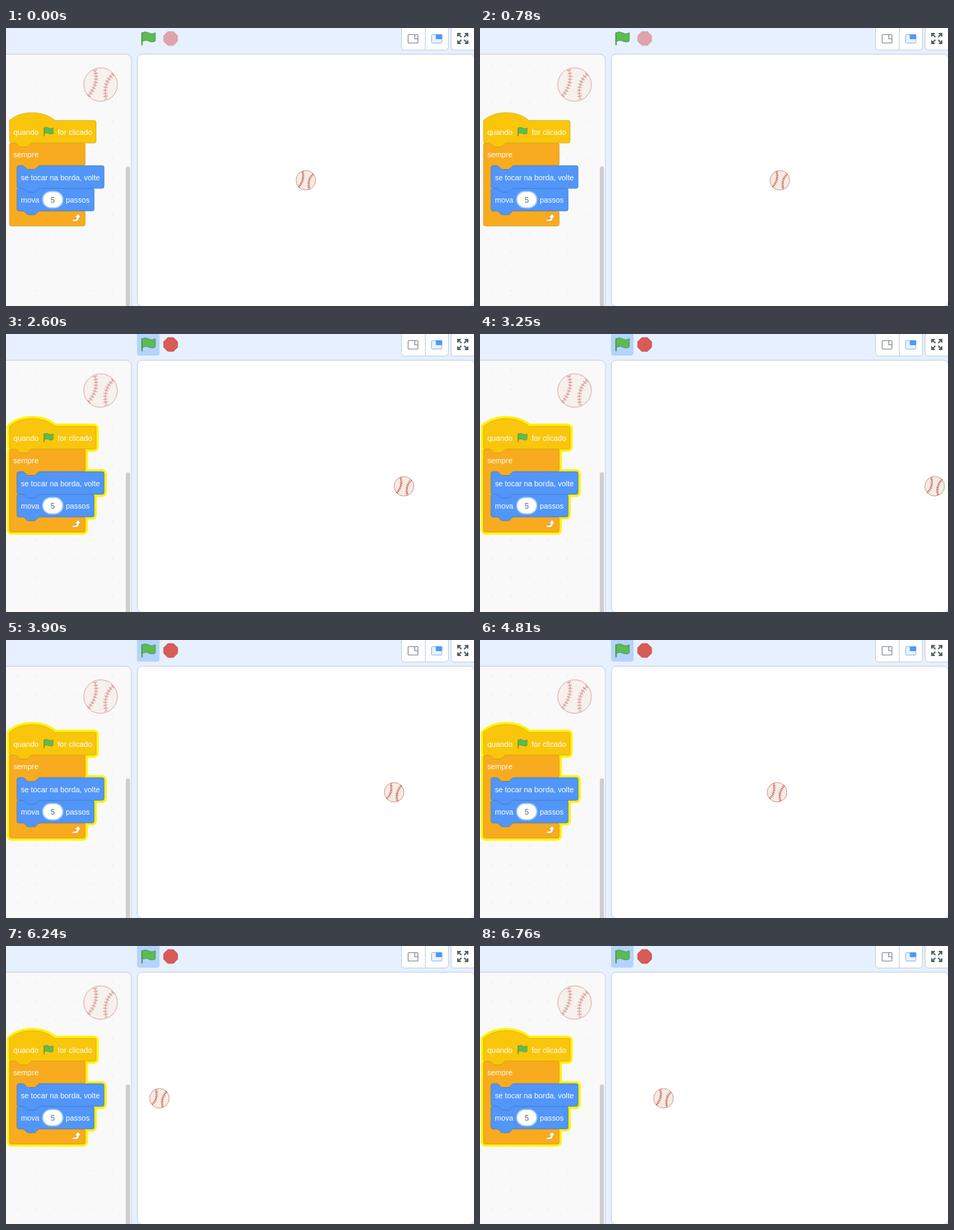
An HTML page for the animation above (6.89 s loop, 668 by 398 pixels).

```html
<!DOCTYPE html>
<html lang="pt">
<head>
<meta charset="utf-8">
<title>Bola na borda</title>
<style>
  html, body { margin: 0; width: 100%; height: 100%; overflow: hidden; background: #e6f0ff; }
  svg { display: block; width: 668px; height: 398px; }
  text { font: 16px "Liberation Sans", Arial, sans-serif; fill: #fff; }
  .panel { stroke: #c6d0df; }
  .event { fill: #f9c60c; stroke: #d3a310; }
  .control { fill: #f8ab1e; stroke: #d18f1b; }
  .motion { fill: #5196f8; stroke: #3c78cf; }
  .seam { fill: none; stroke-width: 1.2; }
  .ticks { fill: none; stroke-width: 6; stroke-dasharray: 1.5 2.8; }
  #flagBack { fill: #4c97ff; fill-opacity: 0; }
  .hover #flagBack { fill-opacity: .15; }
  .running #flagBack { fill-opacity: .33; }
  #stop { fill: #d85b55; opacity: .5; }
  .running #stop { opacity: 1; }
  #glow { visibility: hidden; fill: #fff200; stroke: #fff200; stroke-width: 11; stroke-linejoin: round; }
  .running #glow { visibility: visible; }
</style>
</head>
<body>
<svg id="scene" viewBox="0 0 668 398">
  <defs>
    <pattern id="dots" x="3.5" y="38.5" width="27" height="27" patternUnits="userSpaceOnUse">
      <circle cx="13.5" cy="13.5" r=".8" fill="#dedede"/>
    </pattern>
    <filter id="soft" x="-20%" y="-20%" width="140%" height="140%"><feGaussianBlur stdDeviation=".8"/></filter>
    <g id="flag">
      <path d="M1.2 2V19" stroke="#45993d" stroke-width="1.8" stroke-linecap="round"/>
      <path d="M1.2 2.3C5-.2 8 .8 11 2.3S17 3.6 20 1.8V13.6C17 15.4 14 15.2 11 13.8S5 12.2 1.2 14.4Z" fill="#5dbb55" stroke="#45993d"/>
    </g>
    <g id="baseball">
      <circle r="24" fill="#f6ebe4"/>
      <g id="seams">
        <path class="seam" d="M-8-21Q-2-1-18 17"/>
        <path class="ticks" d="M-8-21Q-2-1-18 17"/>
        <path class="seam" d="M18-15Q3-2 8 21"/>
        <path class="ticks" d="M18-15Q3-2 8 21"/>
      </g>
    </g>
    <path id="corner" d="M-7-2.8V-7H-2.8M-6.4-6.4L-2-2" fill="none" stroke="#4c665f" stroke-width="2"/>
  </defs>

  <rect width="668" height="398" fill="#e6f0ff"/>

  <!-- workspace -->
  <rect class="panel" x="-9.5" y="37.5" width="188.5" height="372" rx="8" fill="#f9f9f9"/>
  <rect y="39" width="170" height="359" fill="url(#dots)"/>
  <rect x="171" y="198" width="6" height="210" rx="3" fill="#cecece"/>
  <use href="#baseball" x="135" y="81" stroke="#c47468" opacity=".6"/>

  <!-- blocks, drawn in block units -->
  <g transform="translate(5 132.3) scale(.675)">
    <g id="glow" filter="url(#soft)"></g>
    <g id="blocks"></g>
    <text x="8" y="31">quando</text>
    <use href="#flag" transform="translate(72 14)"/>
    <text x="102" y="31">for clicado</text>
    <text x="8" y="78">sempre</text>
    <text x="24" y="127">se tocar na borda, volte</text>
    <text x="24" y="174">mova</text>
    <rect x="71.5" y="152" width="40" height="32" rx="16" fill="#fff" stroke="#a9cbfb" stroke-width="5" paint-order="stroke"/>
    <text x="91.5" y="174" text-anchor="middle" style="fill:#575e75">5</text>
    <text x="119" y="174">passos</text>
    <path d="M133 214H141Q147 213 147 206H151L145 198 138 206H142Q142 210 138 210H133Z" fill="#fff" stroke="#cf8b17" stroke-width=".8"/>
  </g>

  <!-- run controls -->
  <rect id="flagBack" x="187" y="-4" width="32" height="35" rx="4"/>
  <use href="#flag" x="193" y="5"/>
  <path id="stop" d="M231 5H239L245 11V19L239 25H231L225 19V11Z" stroke="#b84a48" stroke-width=".6"/>

  <!-- view buttons -->
  <g fill="#fff">
    <rect class="panel" x="564.5" y="-6" width="67" height="37.5" rx="4"/>
    <path class="panel" d="M598.5 0V31"/>
    <rect class="panel" x="635.5" y="-6" width="45" height="37.5" rx="4"/>
  </g>
  <g fill="none" stroke="#858b98" stroke-width="1.2">
    <rect x="574" y="9.5" width="14" height="12" rx="1"/>
    <path d="M583.5 9.5V15.5H588"/>
  </g>
  <rect x="607.5" y="9.5" width="14.5" height="12" rx="1" fill="#eaf3ff" stroke="#8fb8ee"/>
  <rect x="613.5" y="9" width="9" height="7" rx="1" fill="#4c97ff"/>
  <g transform="translate(652 15)">
    <use href="#corner"/>
    <use href="#corner" transform="rotate(90)"/>
    <use href="#corner" transform="rotate(180)"/>
    <use href="#corner" transform="rotate(270)"/>
  </g>

  <!-- stage -->
  <rect class="panel" x="187.5" y="37.5" width="481" height="361" rx="7" fill="#fff"/>
  <use id="ball" href="#baseball" stroke="#bd5c4f"/>

  <path id="cursor" d="M198.5 29V19.3Q198.5 17.3 200 17.3T201.6 19.3V23.6Q203.6 22.6 204.4 24.2 206.4 23.4 207 25 209.6 24.6 209.6 27V30Q209.6 32 208 34.5H200.4Q199.5 32 195.8 28.6 195 26.6 196.6 26.4 197.6 26.6 198.5 29Z"
        fill="#fff" stroke="#343840" stroke-width="1.1" stroke-linejoin="round"/>
</svg>
<script>
const LOOP = 6890, FRAME = 130, STEPS_PER_FRAME = 3.75;
const CLICK = 15, HOVER = 12;
const $ = id => document.getElementById(id);

// Connector outlines: a socket runs left to right, a bump right to left.
const socket = "c2 0 3 1 4 2l4 4c1 1 2 2 4 2h12c2 0 3-1 4-2l4-4c1-1 2-2 4-2";
const bump = "c-2 0-3 1-4 2l-4 4c-1 1-2 2-4 2h-12c-2 0-3-1-4-2l-4-4c-1-1-2-2-4-2";
const topRight = "a4 4 0 0 1 4 4", bottomRight = "a4 4 0 0 1-4 4";
const bottomLeft = "a4 4 0 0 1-4-4", topLeft = "a4 4 0 0 1 4-4";

const stackBlock = w =>
  `M0 4${topLeft}H12${socket}H${w - 4}${topRight}V44${bottomRight}H48${bump}H4${bottomLeft}Z`;
const hatBlock = w =>
  `M0 0c25-22 71-22 96 0H${w - 4}${topRight}V44${bottomRight}H48${bump}H4${bottomLeft}Z`;
const loopBlock = w =>
  `M0 4${topLeft}H12${socket}H${w - 4}${topRight}V44${bottomRight}H64${bump}H20a4 4 0 0 0-4 4` +
  `V140a4 4 0 0 0 4 4H28${socket}H${w - 4}${topRight}V172${bottomRight}H4${bottomLeft}Z`;

const blocks = [
  ["control", 0, 48, loopBlock(160)],
  ["event", 0, 0, hatBlock(183)],
  ["motion", 16, 144, stackBlock(163)],
  ["motion", 16, 96, stackBlock(184)]
];
const drawBlocks = styled => blocks.map(([kind, x, y, d]) =>
  `<path ${styled ? `class="${kind}"` : ""} transform="translate(${x} ${y})" d="${d}"/>`).join("");
$("glow").innerHTML = drawBlocks(false);
$("blocks").innerHTML = drawBlocks(true);

// Five pixels per step; the ball turns round at each stage edge.
function ballPose(frame) {
  if (frame < CLICK) return { x: 428, turn: 0 };
  const step = Math.floor(STEPS_PER_FRAME * (frame - 20) + .75);
  if (step < 19) return { x: 568 + 5 * step, turn: 0 };
  if (step < 109) return { x: 744 - 5 * step, turn: 180 };
  return { x: 5 * step - 338, turn: 0 };
}

function draw(now) {
  const frame = Math.floor((now % LOOP) / FRAME);
  const { x, turn } = ballPose(frame);
  $("ball").setAttribute("transform", `translate(${x} 218) rotate(${turn}) scale(.585)`);

  const running = frame >= CLICK;
  const hovering = frame >= HOVER && !running;
  $("scene").setAttribute("class", running ? "running" : hovering ? "hover" : "");

  const away = Math.max(0, HOVER - frame, frame - CLICK);
  $("cursor").setAttribute("transform", `translate(0 ${-14 * away})`);
  $("cursor").setAttribute("visibility", away < 3 ? "visible" : "hidden");
  requestAnimationFrame(draw);
}
draw(performance.now());
</script>
</body>
</html>
```
